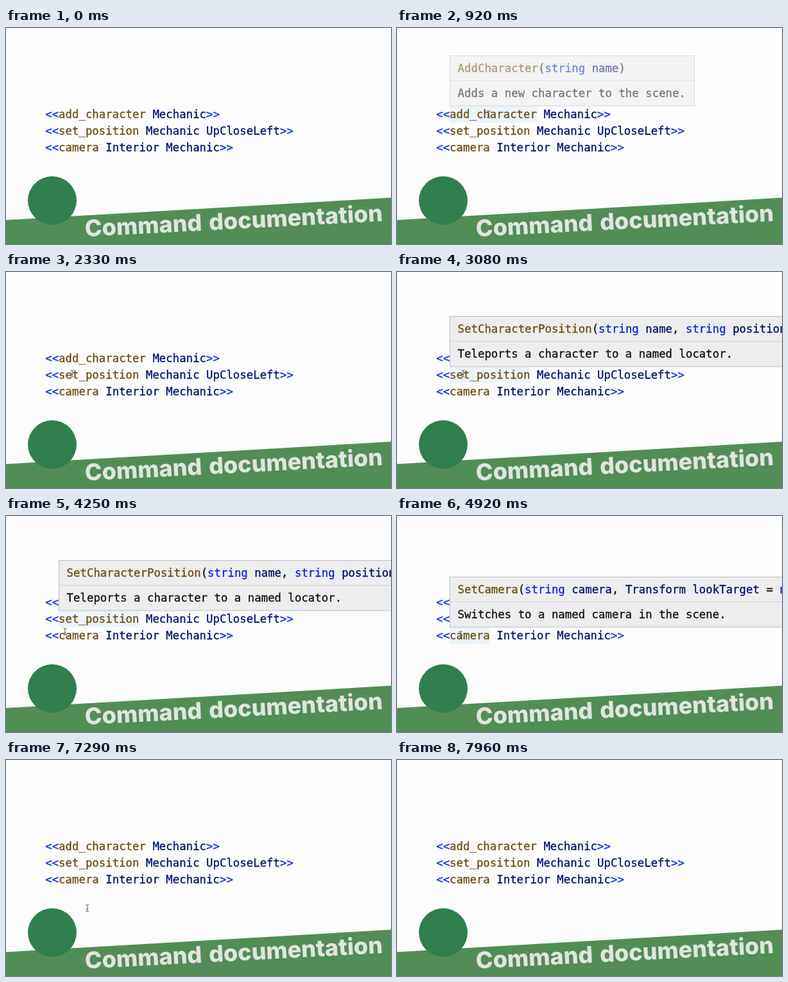
Recreate the animation shown at these times as an HTML page. Size 600 px wide and 338 px high, loop 8000 ms.

```html
<!DOCTYPE html>
<html lang="en">
<head>
<meta charset="utf-8">
<title>Command documentation</title>
<style>
  html, body { margin: 0; width: 100%; height: 100%; overflow: hidden; background: #fcfcfc; }
  svg { display: block; width: 600px; height: 338px; }

  .code { font: 17.38px "DejaVu Sans Mono", Menlo, monospace; --ink: #00106e; }
  .code text, .code tspan { fill: var(--ink); stroke: var(--ink); stroke-width: .3px; }
  .mark { --ink: #0f2fe0; }
  .fn { --ink: #6b4c12; }
  .key { --ink: #0a1fe8; }
  .plain { --ink: #111; }
  .glow { fill: #ebf4fa; }
  .box { fill: #ededed; stroke: #bdbdbd; }
  .rule { stroke: #cfcfcf; }
  .title { font: 800 35px Inter, "Open Sans", sans-serif; word-spacing: .08em; fill: #e1e4e1; }
  .beam { fill: none; stroke: #555; stroke-width: 1; }

  .one, .two, .three, .pointer { animation: 8s infinite; }
  .one { animation-name: first; --start: 865ms; }
  .two { animation-name: second; --start: 2650ms; }
  .three { animation-name: third; --start: 4560ms; }

  /* Each panel fades in over 100 ms from its own start time. */
  .panel { animation: pop 8s linear calc(var(--start) - 8s) infinite; }
  @keyframes pop { 0% { opacity: 0; } 1.25%, 100% { opacity: 1; } }

  /* Panels and highlights disappear at once. */
  @keyframes first {
    0%, 10.8% { opacity: 0; }
    10.81%, 25% { opacity: 1; }
    25.01%, 100% { opacity: 0; }
  }
  @keyframes second {
    0%, 33.12% { opacity: 0; }
    33.13%, 54.1% { opacity: 1; }
    54.11%, 100% { opacity: 0; }
  }
  @keyframes third {
    0%, 56.99% { opacity: 0; }
    57%, 89.4% { opacity: 1; }
    89.41%, 100% { opacity: 0; }
  }

  .pointer { animation-name: wander; animation-timing-function: ease-in-out; }
  @keyframes wander {
    0%, 1% { transform: translate(260px, 305px); }
    4.5% { transform: translate(170px, 78px); }
    7%, 23.5% { transform: translate(143px, 135px); }
    28%, 50.5% { transform: translate(103px, 159px); }
    53.1% { transform: translate(92px, 181px); }
    55%, 88.5% { transform: translate(99px, 186px); }
    95% { transform: translate(180px, 320px); }
    100% { transform: translate(260px, 305px); }
  }
</style>
</head>
<body>
<svg viewBox="0 0 600 338">
  <rect width="600" height="338" fill="#fcfcfc"/>

  <rect class="glow one" x="82" y="122" width="136" height="26"/>
  <rect class="glow two" x="82" y="148" width="126" height="26"/>
  <rect class="glow three" x="82" y="174" width="62" height="26"/>

  <g class="code">
    <text x="61.2" y="141"><tspan class="mark">&lt;&lt;</tspan><tspan class="fn">add_character</tspan> Mechanic<tspan class="mark">&gt;&gt;</tspan></text>
    <text x="61.2" y="167"><tspan class="mark">&lt;&lt;</tspan><tspan class="fn">set_position</tspan> Mechanic UpCloseLeft<tspan class="mark">&gt;&gt;</tspan></text>
    <text x="61.2" y="193"><tspan class="mark">&lt;&lt;</tspan><tspan class="fn">camera</tspan> Interior Mechanic<tspan class="mark">&gt;&gt;</tspan></text>
  </g>

  <g class="code" transform="translate(82 43)">
    <g class="one"><g class="panel">
      <rect class="box" x=".5" y=".5" width="381" height="78.5"/>
      <path class="rule" d="M1 39.5H381"/>
      <text x="12.6" y="26"><tspan class="fn">AddCharacter</tspan><tspan class="plain">(</tspan><tspan class="key">string</tspan> name<tspan class="plain">)</tspan></text>
      <text class="plain" x="12.6" y="65">Adds a new character to the scene.</text>
    </g></g>
  </g>

  <g class="code" transform="translate(82 69)">
    <g class="two"><g class="panel">
      <rect class="box" x=".5" y=".5" width="560" height="78.5"/>
      <path class="rule" d="M1 39.5H560"/>
      <text x="12.6" y="26"><tspan class="fn">SetCharacterPosition</tspan><tspan class="plain">(</tspan><tspan class="key">string</tspan> name<tspan class="plain">,</tspan> <tspan class="key">string</tspan> position<tspan class="plain">)</tspan></text>
      <text class="plain" x="12.6" y="65">Teleports a character to a named locator.</text>
    </g></g>
  </g>

  <g class="code" transform="translate(82 95)">
    <g class="three"><g class="panel">
      <rect class="box" x=".5" y=".5" width="600" height="78.5"/>
      <path class="rule" d="M1 39.5H600"/>
      <text x="12.6" y="26"><tspan class="fn">SetCamera</tspan><tspan class="plain">(</tspan><tspan class="key">string</tspan> camera<tspan class="plain">,</tspan> Transform lookTarget <tspan class="plain">=</tspan> <tspan class="key">null</tspan><tspan class="plain">)</tspan></text>
      <text class="plain" x="12.6" y="65">Switches to a named camera in the scene.</text>
    </g></g>
  </g>

  <g class="pointer">
    <path class="beam" d="M-2.5-5.5Q0-5.5 0-4Q0-5.5 2.5-5.5M0-4V4M-2.5 5.5Q0 5.5 0 4Q0 5.5 2.5 5.5M-1.5 1.5H1.5"/>
  </g>

  <path fill="#528d57" d="M0 300.6L600 265.5V338H0Z"/>
  <circle cx="72" cy="270" r="38" fill="#2f7f4f"/>
  <text class="title" id="title" transform="translate(123.5 326.5) rotate(-3)">Command documentation</text>
</svg>
<script>
  // Choose the type size at which the title spans the banner.
  const title = document.getElementById("title");
  const size = 35 * 465 / title.getComputedTextLength();
  title.style.fontSize = size.toFixed(2) + "px";
</script>
</body>
</html>
```
